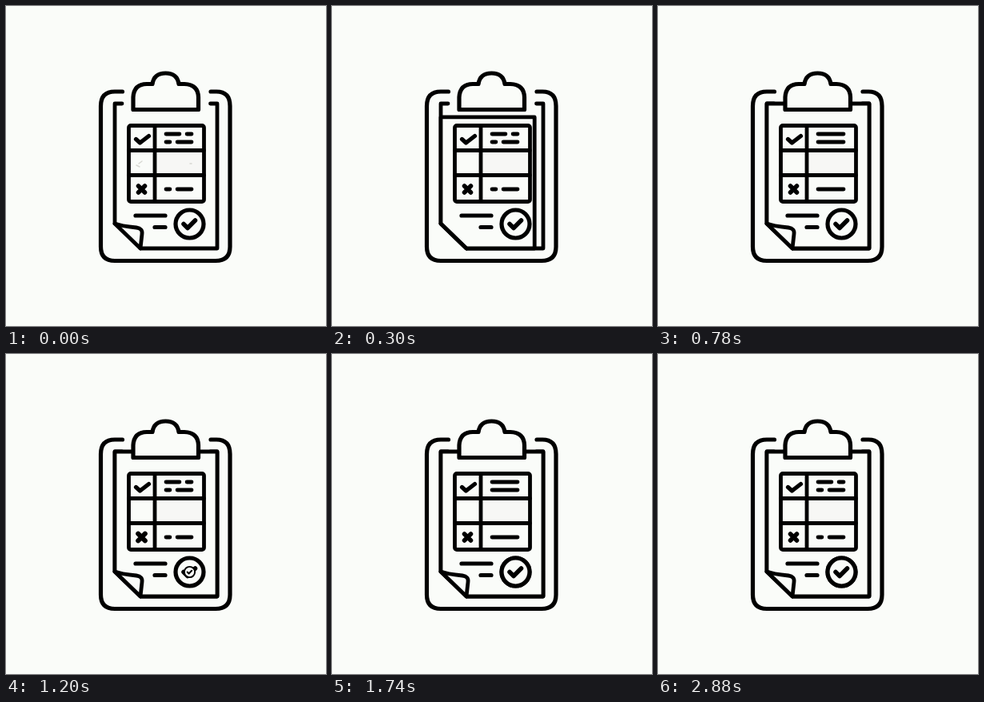
An HTML page for the animation above (2940 ms loop, 400x400 px).

```html
<!DOCTYPE html>
<html lang="en">
<head>
<meta charset="utf-8">
<title>Clipboard checklist</title>
<style>
html, body { margin: 0; width: 100%; height: 100%; overflow: hidden; background: #fafcf9; }
svg { display: block; width: 100vw; height: 100vh; }
</style>
</head>
<body>
<svg viewBox="0 0 400 400" fill="none" stroke="#000" stroke-width="5.2" stroke-linecap="round" stroke-linejoin="round">
  <defs>
    <g id="badge">
      <circle r="17.500" fill="#fafcf9"/>
      <path stroke-width="5.500" d="M-7.500 0L-2.500 5L7 -4.500"/>
    </g>
  </defs>
  <path d="M145.500 107H136Q118.500 107 118.500 125V301Q118.500 318.500 136 318.500H262Q280 318.500 280 301V125Q280 107 263 107H256"/>
  <path stroke-width="4.800" d="M145 122H136V272L168 303H264V122H255.500"/>
  <path id="sheet" stroke-width="4.800" fill="#fafcf9"/>
  <path id="fold" stroke-width="4.800"/>
  <path fill="#fafcf9" d="M159 129.500V114Q160 97.500 176 97.500H183Q185 84 199.500 84Q214 84 216 97.500H223Q240 98 240.500 114V129.500Z"/>
  <rect x="189" y="184" width="55" height="24" fill="#f7f7f5" stroke="none"/>
  <path id="smudge" stroke="#d8d8d3" stroke-width="1.500" d="M163 199l4 2M166 197l4-3M230 197h2"/>
  <g stroke-width="4.800">
    <rect x="153.500" y="149.500" width="94" height="95" rx="2.500"/>
    <path d="M153.500 180.500H247.500M153.500 211.500H247.500M186 149.500V244.500"/>
    <path id="rows"/>
  </g>
  <path d="M162.500 166.500L167.500 171L178.500 162.500"/>
  <path id="cross" stroke-width="5.500" d="M-4 -4L4 4M4 -4L-4 4"/>
  <path d="M162 262H199M186 276.500H199"/>
  <use href="#badge" transform="translate(229.500 272.500)"/>
  <use href="#badge" id="stamp"/>
</svg>
<script>
const LOOP = 2940, STEP = 60, BEAT = 960, GROW = 580;
const el = id => document.getElementById(id);
const set = (id, name, value) => el(id).setAttribute(name, value);

const progress = (t, from, to) => Math.min(1, Math.max(0, (t - from) / (to - from)));
const smooth = (t, from, to) => {
  const p = progress(t, from, to);
  return p * p * (3 - 2 * p);
};
const grow = (t, from) => 1 - (1 - progress(t, from, from + GROW)) ** 3;
const lerp = (a, b, p) => a + (b - a) * p;

// Text lines: height and centre of the gap.
const lines = [[160, 221.5], [170, 209.5], [229, 209.5]];

function drawRows(gap) {
  const half = 4.6 * gap;
  const path = lines.map(([y, mid]) => half < 0.2
    ? `M200 ${y}H232`
    : `M200 ${y}H${mid - half}M${mid + half} ${y}H232`);
  set("rows", "d", path.join(""));
}

// The corner of the sheet curls up from the diagonal cut.
function drawFold(curl) {
  const mix = (flat, curled) => lerp(flat, curled, curl);
  set("fold", "d", `M136 272Q${mix(140, 143)} ${mix(276, 275)} ${mix(151, 163)} ${mix(286.5, 277)}` +
    `Q${mix(153, 171)} ${mix(288.5, 278)} ${mix(155, 170)} ${mix(290.4, 285)}L168 303`);
}

function draw(time) {
  const t = Math.floor((time % LOOP) / STEP) * STEP;
  const atStart = t < STEP;

  // A fresh sheet grows out of the cut corner and covers the old one.
  const size = grow(t, 0);
  set("sheet", "d", `M136 ${lerp(272, 122, size)}H${lerp(168, 264, size)}V303H168L136 272Z`);
  set("sheet", "visibility", atStart ? "hidden" : "visible");
  drawFold(atStart ? 1 : smooth(t, 540, 720));

  const beat = t % BEAT;
  drawRows(1 - smooth(beat, 300, 420) + smooth(beat, 780, BEAT));

  const stamp = grow(t, 1115);
  set("stamp", "transform", `translate(229.5 272.5) scale(${stamp})`);
  set("stamp", "visibility", stamp > 0 ? "visible" : "hidden");

  const pop = smooth(t, 1080, 1200) - smooth(t, 1200, 1320);
  set("cross", "transform", `translate(169.5 229) scale(${1 + 0.08 * pop})`);
  set("smudge", "visibility", atStart ? "visible" : "hidden");
}

const start = performance.now();
function frame() {
  draw(performance.now() - start);
  requestAnimationFrame(frame);
}
frame();
</script>
</body>
</html>
```
